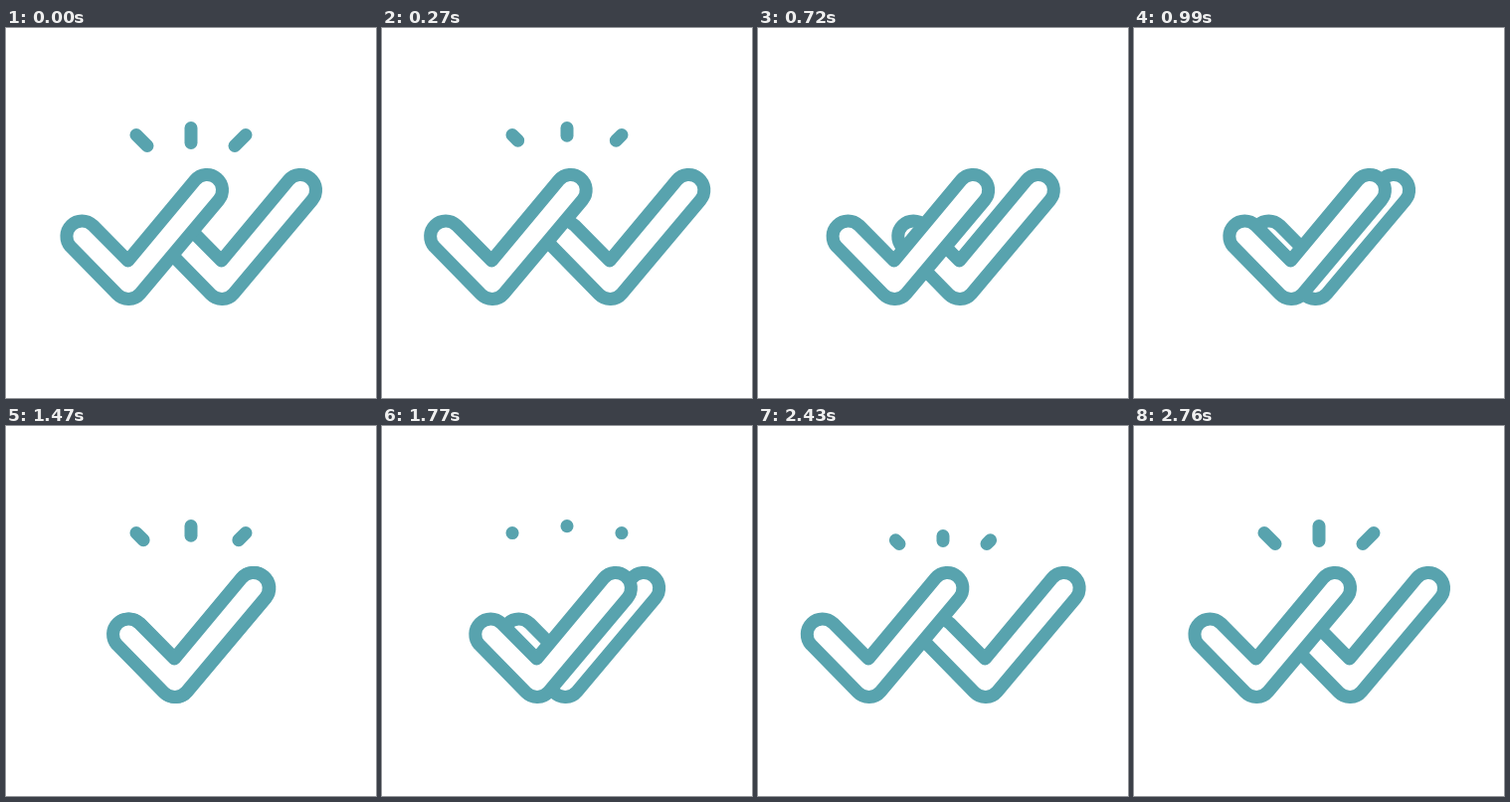
An HTML page for the animation above (3600 ms loop, 372 px wide and 372 px high).

```html
<!DOCTYPE html>
<html lang="en">
<head>
<meta charset="utf-8">
<title>Double check</title>
<style>
  html, body { margin: 0; width: 100%; height: 100%; overflow: hidden; background: #fff; }
  svg { display: block; width: 100vw; height: 100vh; }
  svg * { stroke: #58a3ae; stroke-width: 13; stroke-linecap: round; stroke-linejoin: round; }
</style>
</head>
<body>
<svg viewBox="0 0 372 372">
  <defs>
    <path id="check" fill="#fff" d="M134.1 198.2L169.6 234L237.1 153A15.5 15.5 0 0 1 260.9 173
      L181.9 267A15.5 15.5 0 0 1 158.9 267.8L111.9 219.8A15.5 15.5 0 0 1 134.1 198.2Z"/>
  </defs>
  <use id="back" href="#check"/>
  <use id="front" href="#check"/>
  <line class="ray"/><line class="ray"/><line class="ray"/>
</svg>
<script>
const LOOP = 3600, STEP = 30;
const REST = 47, WIDE = 60;
const GROW = 260, SHRINK = 550;
// Each ray: inner end, then outer end
const RAYS = [[142, 118.5, 131, 107.5], [186, 115.5, 186, 100.5], [230, 118.5, 241, 107.5]];

const back = document.getElementById('back');
const front = document.getElementById('front');
const lines = document.querySelectorAll('.ray');

// Eased progress from 0 to 1, starting at a given time
function ease(t, start, length) {
  const s = Math.min(1, Math.max(0, (t - start) / length));
  return s * s * (3 - 2 * s);
}

// Swing wide, merge, then the same in reverse
function spread(t) {
  const u = Math.min(t, 2730 - t);
  return REST + (WIDE - REST) * ease(u, 0, 200) - WIDE * ease(u, 200, 1110);
}

// Range of the ray that shows, from inner (0) to outer end (1)
function rayRange(t) {
  if (t < 800) return [ease(t, 0, SHRINK), 1];
  if (t < 2100) return [ease(t, 1250, SHRINK), ease(t, 990, GROW)];
  return [0, ease(t, 2330, GROW)];
}

function draw(t) {
  const d = spread(t);
  front.setAttribute('x', -d);
  back.setAttribute('x', d);

  const [from, to] = rayRange(t);
  RAYS.forEach(([x1, y1, x2, y2], i) => {
    const set = (name, value) => lines[i].setAttribute(name, value);
    set('x1', x1 + (x2 - x1) * from);
    set('y1', y1 + (y2 - y1) * from);
    set('x2', x1 + (x2 - x1) * to);
    set('y2', y1 + (y2 - y1) * to);
    set('visibility', to > from ? 'visible' : 'hidden');
  });
}

const begin = performance.now();
function tick() {
  const t = (performance.now() - begin) % LOOP;
  draw(Math.floor(t / STEP) * STEP);
  requestAnimationFrame(tick);
}
tick();
</script>
</body>
</html>
```
